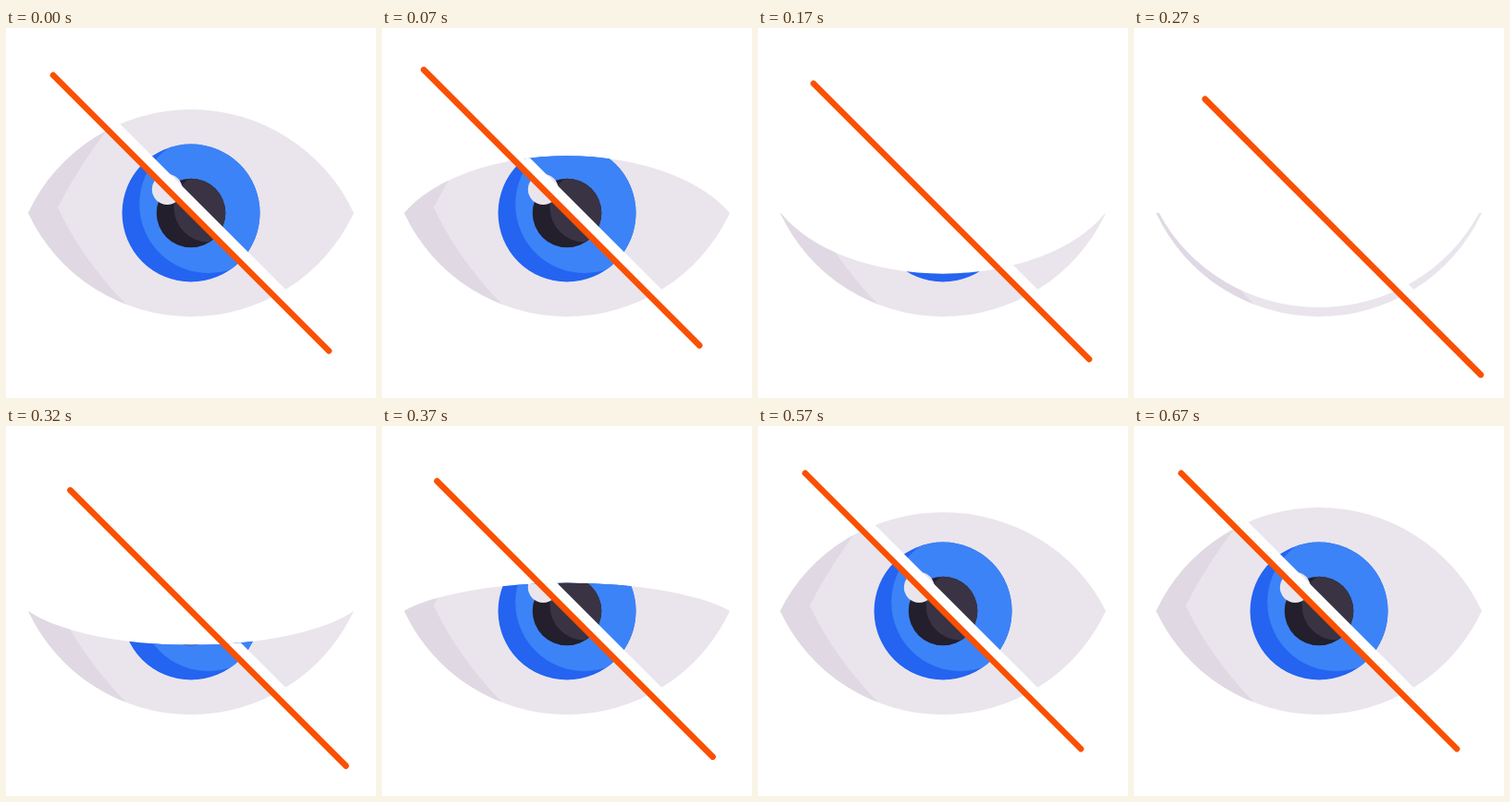
An HTML page for the animation above (0.7 s loop, 400 by 400 pixels).

```html
<!DOCTYPE html>
<html lang="en">
<head>
<meta charset="utf-8">
<title>Hidden eye</title>
<style>
  html, body { margin: 0; width: 100%; height: 100%; overflow: hidden; background: #fff; }
  svg { display: block; width: 100%; height: 100%; }
</style>
</head>
<body>
<svg viewBox="0 0 400 400">
  <defs>
    <clipPath id="opening"><path id="lids"/></clipPath>
    <clipPath id="irisClip"><circle cx="200" cy="200" r="74.5"/></clipPath>
    <clipPath id="pupilClip"><circle cx="200" cy="200" r="37.3"/></clipPath>
  </defs>
  <g clip-path="url(#opening)">
    <rect width="400" height="400" fill="#eae5ec"/>
    <path d="M114 104Q80 147 56 194Q82 250 132 301L0 320V80Z" fill="#e0d9e3"/>
    <g clip-path="url(#irisClip)">
      <circle cx="200" cy="200" r="75" fill="#2464f1"/>
      <circle cx="218.7" cy="190.5" r="74.5" fill="#3c83f7"/>
    </g>
    <g clip-path="url(#pupilClip)">
      <circle cx="200" cy="200" r="38" fill="#231f2c"/>
      <circle cx="219" cy="194" r="37.5" fill="#393344"/>
    </g>
    <circle cx="174.3" cy="174.5" r="16.5" fill="#eae5ec"/>
    <path d="M0 0L400 400V380.5L19.5 0Z" fill="#fff"/>
  </g>
  <path id="slash" d="M51 51L349 349" stroke="#fa5000" stroke-width="6.6" stroke-linecap="round"/>
</svg>
<script>
const LOOP = 700, STEP = 25;
const lids = document.getElementById('lids');
const slash = document.getElementById('slash');

// Cubic Bezier easing with flat ends: handles at (x1, 0) and (x2, 1).
function ease(x, x1 = 1 / 3, x2 = 2 / 3) {
  if (x <= 0) return 0;
  if (x >= 1) return 1;
  let lo = 0, hi = 1;
  for (let i = 0; i < 24; i++) {
    const u = (lo + hi) / 2, v = 1 - u;
    if (3 * u * v * v * x1 + 3 * u * u * v * x2 + u ** 3 < x) lo = u;
    else hi = u;
  }
  return lo * lo * (3 - 2 * lo);
}

const span = (n, from, to) => (n - from) / (to - from);

function draw(n) {
  const closed = ease(span(n, 0, 9.7)) - ease(span(n, 11, 27), 0.16, 0);
  const scale = (112 - 220 * closed) / 112;
  const half = 176 - 3 * closed ** 8;
  lids.setAttribute('d', `M24 200A194.3 194.3 0 0 0 376 200H${200 + half}` +
    `A194.3 ${194.3 * Math.abs(scale)} 0 0 ${scale > 0 ? 0 : 1} ${200 - half} 200Z`);

  const shift = -9 * ease(span(n, 0, 5)) + 36 * ease(span(n, 5, 9)) - 27 * ease(span(n, 10, 18));
  slash.setAttribute('transform', `translate(${shift} ${shift})`);
}

// The motion advances in 25 ms steps, changing at 20, 50, 70, 100 ms and so on.
function tick() {
  draw(Math.floor((performance.now() % LOOP + 5) / STEP) % (LOOP / STEP));
  requestAnimationFrame(tick);
}
tick();
</script>
</body>
</html>
```
